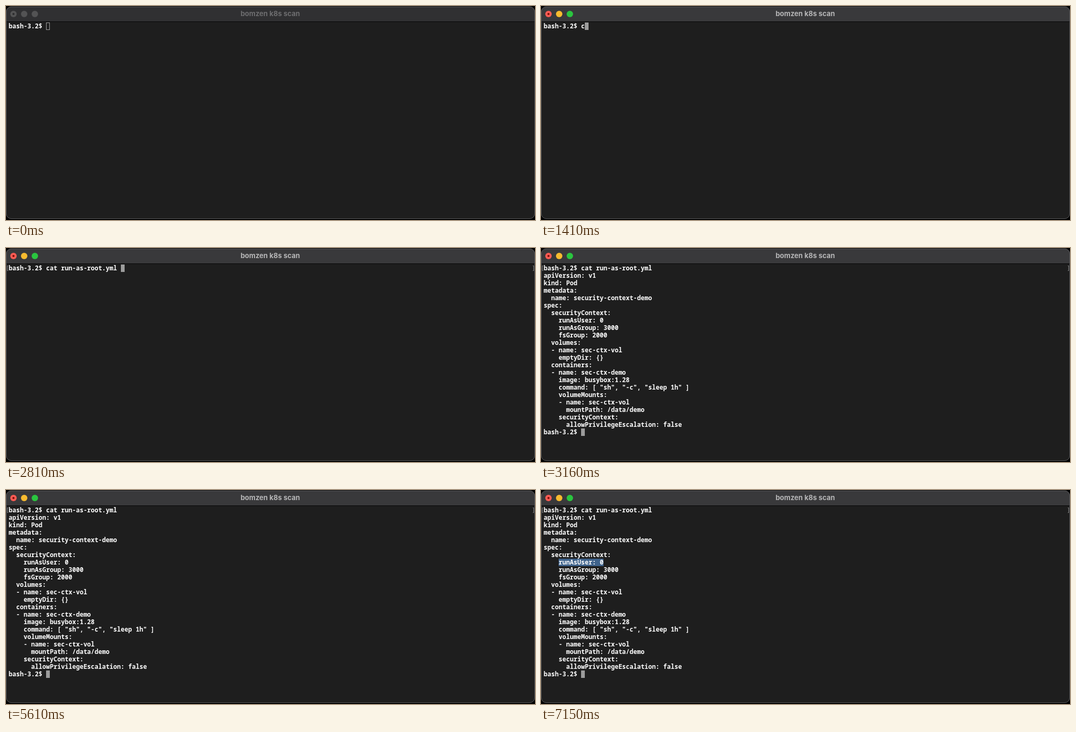
Write an HTML page that moves like this. It is 990 by 402 pixels and loops after 8000 ms.

```html
<!DOCTYPE html>
<html lang="en">
<head>
<meta charset="utf-8">
<title>Terminal</title>
<style>
  html, body { margin: 0; width: 100%; height: 100%; overflow: hidden; background: #000; }
  svg { display: block; width: 990px; height: 402px; }
  #title { font: 700 13px Inter, Roboto, sans-serif; text-anchor: middle; fill: #b6b6b7; }
  #lines text { font: 600 11.667px "Noto Sans Mono", "DejaVu Sans Mono", monospace; fill: #fff; white-space: pre; }
  #bar { fill: #39393b; }
  #cursor { fill: #9c9c9c; stroke: #9c9c9c; }
  .idle #bar { fill: #303032; }
  .idle #title { fill: #6d6d6f; }
  .idle .light { fill: #535354; }
  .idle #dot { fill: #2c2c2d; }
  .idle #cursor { fill: none; }
</style>
</head>
<body>
<svg id="stage" viewBox="0 0 990 402">
  <clipPath id="frame"><rect y="1" width="990" height="399" rx="10"/></clipPath>
  <g clip-path="url(#frame)">
    <rect width="990" height="402" fill="#1e1e1e"/>
    <rect id="bar" width="990" height="29"/>
    <rect y="29" width="990" height="1" fill="#060606"/>
  </g>
  <rect x=".5" y="1.5" width="989" height="398" rx="9.5" fill="none" stroke="#59595b"/>
  <circle class="light" cx="14" cy="15" r="6" fill="#fe5b53"/>
  <circle id="dot" cx="14" cy="15" r="2" fill="#7c0f0b"/>
  <circle class="light" cx="34" cy="15" r="6" fill="#f8bb2f"/>
  <circle class="light" cx="54" cy="15" r="6" fill="#2ac53f"/>
  <text id="title" x="494.5" y="19">bomzen k8s scan</text>
  <path id="marks" d="M4 33.5H2.5V42.5H4M986 33.5H987.5V42.5H986" fill="none" stroke="#8b8b8b"/>
  <rect id="selection" y="129" height="14" fill="#3f638c"/>
  <rect id="cursor" width="6" height="13"/>
  <g id="lines"></g>
  <path id="pointer" d="M353 162.5Q356.5 162.5 356.5 165V177Q356.5 179.5 353 179.5M360 162.5Q356.5 162.5 356.5 165M356.5 177Q356.5 179.5 360 179.5" fill="none" stroke="#c8c8c8"/>
</svg>
<script>
const LOOP = 8000, LEFT = 5, TOP = 31, COL = 7, ROW = 14;
const PROMPT = 'bash-3.2$ ';
const OUTPUT = `apiVersion: v1
kind: Pod
metadata:
  name: security-context-demo
spec:
  securityContext:
    runAsUser: 0
    runAsGroup: 3000
    fsGroup: 2000
  volumes:
  - name: sec-ctx-vol
    emptyDir: {}
  containers:
  - name: sec-ctx-demo
    image: busybox:1.28
    command: [ "sh", "-c", "sleep 1h" ]
    volumeMounts:
    - name: sec-ctx-vol
      mountPath: /data/demo
    securityContext:
      allowPrivilegeEscalation: false`.split('\n');
const COMMAND = 'cat run-as-root.yml ';

// [start time, value] steps
const TYPED = [[0, 0], [1410, 1], [1550, 2], [1760, 3], [1830, 4], [2250, 5], [2600, 6], [2740, 7], [2810, 20]];
const SELECTED_FROM = [[0, 16], [6730, 15], [6800, 14], [6870, 13], [6940, 13], [7010, 12], [7150, 4]];

const $ = id => document.getElementById(id);
const stepAt = (steps, t) => steps.findLast(([start]) => t >= start)[1];
const show = (id, on) => $(id).setAttribute('visibility', on ? 'visible' : 'hidden');
const set = (id, attrs) => Object.entries(attrs).forEach(([k, v]) => $(id).setAttribute(k, v));

const rows = Array.from({ length: OUTPUT.length + 2 }, (_, i) => {
  const row = document.createElementNS('http://www.w3.org/2000/svg', 'text');
  row.setAttribute('x', LEFT);
  row.setAttribute('y', TOP + 11 + i * ROW);
  return $('lines').appendChild(row);
});

function draw(t) {
  const typed = stepAt(TYPED, t);
  const done = t >= 3160;
  const lines = [PROMPT + COMMAND.slice(0, typed)];
  if (done) lines.push(...OUTPUT, PROMPT);
  rows.forEach((row, i) => {
    const text = lines[i] || '';
    if (row.textContent !== text) row.textContent = text;
  });

  $('stage').classList.toggle('idle', t < 500);
  set('cursor', {
    x: LEFT + lines.at(-1).length * COL + 0.5,
    y: TOP + (lines.length - 1) * ROW + 0.5
  });

  const from = stepAt(SELECTED_FROM, t);
  set('selection', { x: LEFT + from * COL, width: (16 - from) * COL });
  show('marks', t >= 2810);
  show('pointer', t >= 5540 && t < 5610);
}

function tick() {
  draw(performance.now() % LOOP);
  requestAnimationFrame(tick);
}
tick();
</script>
</body>
</html>
```
